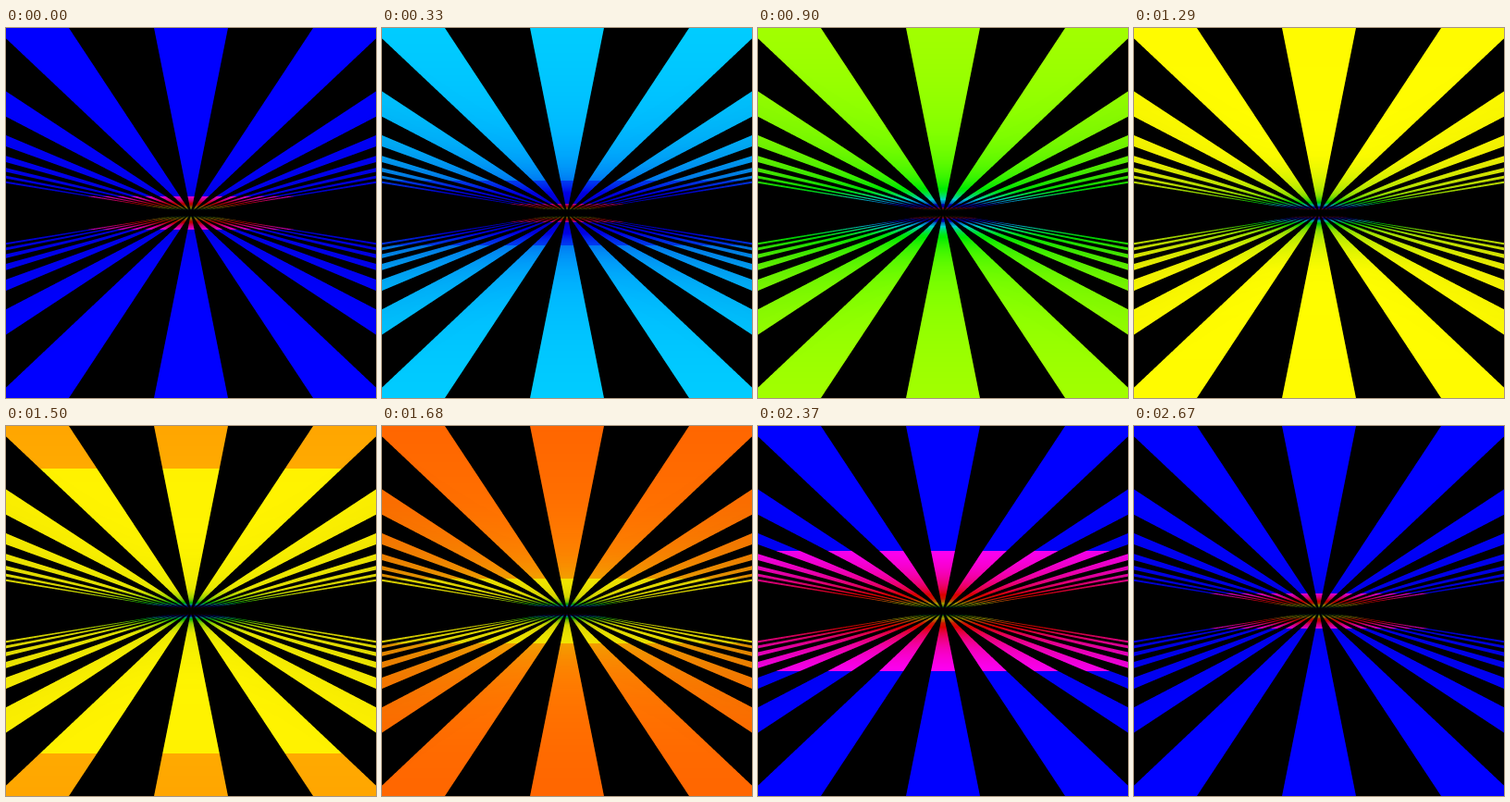
An HTML page with a canvas for the animation above (2700 ms loop, 400 by 400 pixels).

```html
<!DOCTYPE html>
<html>
<head>
<meta charset="utf-8">
<style>
html, body { margin: 0; height: 100%; overflow: hidden; background: #000; }
canvas { display: block; }
</style>
</head>
<body>
<canvas id="stage" width="400" height="400"></canvas>
<script>
const SIZE = 400, MID = 200, LOOP = 2700, STEP = 30;
const SPEED = 0.000123;      // depth travelled per ms, depth = 1 / distance from horizon
const PERIOD = 0.86, HALF = 0.2, LANES = 7;
// [time, hue]; a repeated time is a hard change
const HUES = [
  [0, 240], [138, 225], [138, 210], [330, 192], [600, 125], [900, 82],
  [1200, 60], [1488, 57], [1488, 40], [1680, 24], [1780, 8], [1950, 0],
  [2100, -24], [2285, -58], [2285, -120], [2700, -120]
];

const ctx = document.getElementById('stage').getContext('2d');

function hueAt(time) {
  const t = ((time % LOOP) + LOOP) % LOOP;
  const i = HUES.findIndex(([end]) => end > t);
  const [t0, h0] = HUES[i - 1], [t1, h1] = HUES[i];
  return h0 + (h1 - h0) * (t - t0) / (t1 - t0);
}

function onStripe(x, y) {
  const ratio = x / Math.abs(y);
  const lane = Math.round(ratio / PERIOD);
  return Math.abs(lane) <= LANES && Math.abs(ratio - lane * PERIOD) < HALF;
}

// Share of a pixel covered by stripes, from 4 x 4 samples
function coverage(px, py) {
  let hits = 0;
  for (let i = 0; i < 16; i++) {
    const x = px + (i % 4 + 0.5) / 4 - MID;
    const y = py + ((i >> 2) + 0.5) / 4 - MID;
    if (onStripe(x, y)) hits++;
  }
  return hits / 16;
}

// Black mask with the stripes cut out, fading with distance
function makeMask() {
  const mask = document.createElement('canvas');
  mask.width = mask.height = SIZE;
  const maskCtx = mask.getContext('2d');
  const image = maskCtx.createImageData(SIZE, SIZE);
  for (let y = 0; y < SIZE; y++) {
    for (let x = 0; x < SIZE; x++) {
      const dx = x + 0.5 - MID, dy = y + 0.5 - MID;
      const far = Math.hypot(dx, dy, 100) / Math.abs(dy);
      const light = Math.max(0, Math.min(1, 1.05 - far / 30));
      image.data[(y * SIZE + x) * 4 + 3] = 255 * (1 - coverage(x, y) * light);
    }
  }
  maskCtx.putImageData(image, 0, 0);
  return mask;
}

const mask = makeMask();

function draw(now) {
  const t = Math.floor(now % LOOP / STEP) * STEP;
  for (let row = 0; row < MID; row++) {
    const depth = 1 / (MID - row - 0.5) - 1 / MID;
    ctx.fillStyle = `hsl(${hueAt(t - depth / SPEED)}, 100%, 50%)`;
    ctx.fillRect(0, row, SIZE, 1);
    ctx.fillRect(0, SIZE - 1 - row, SIZE, 1);
  }
  ctx.drawImage(mask, 0, 0);
}

const start = performance.now();
function tick() {
  draw(performance.now() - start);
  requestAnimationFrame(tick);
}
tick();
</script>
</body>
</html>
```
